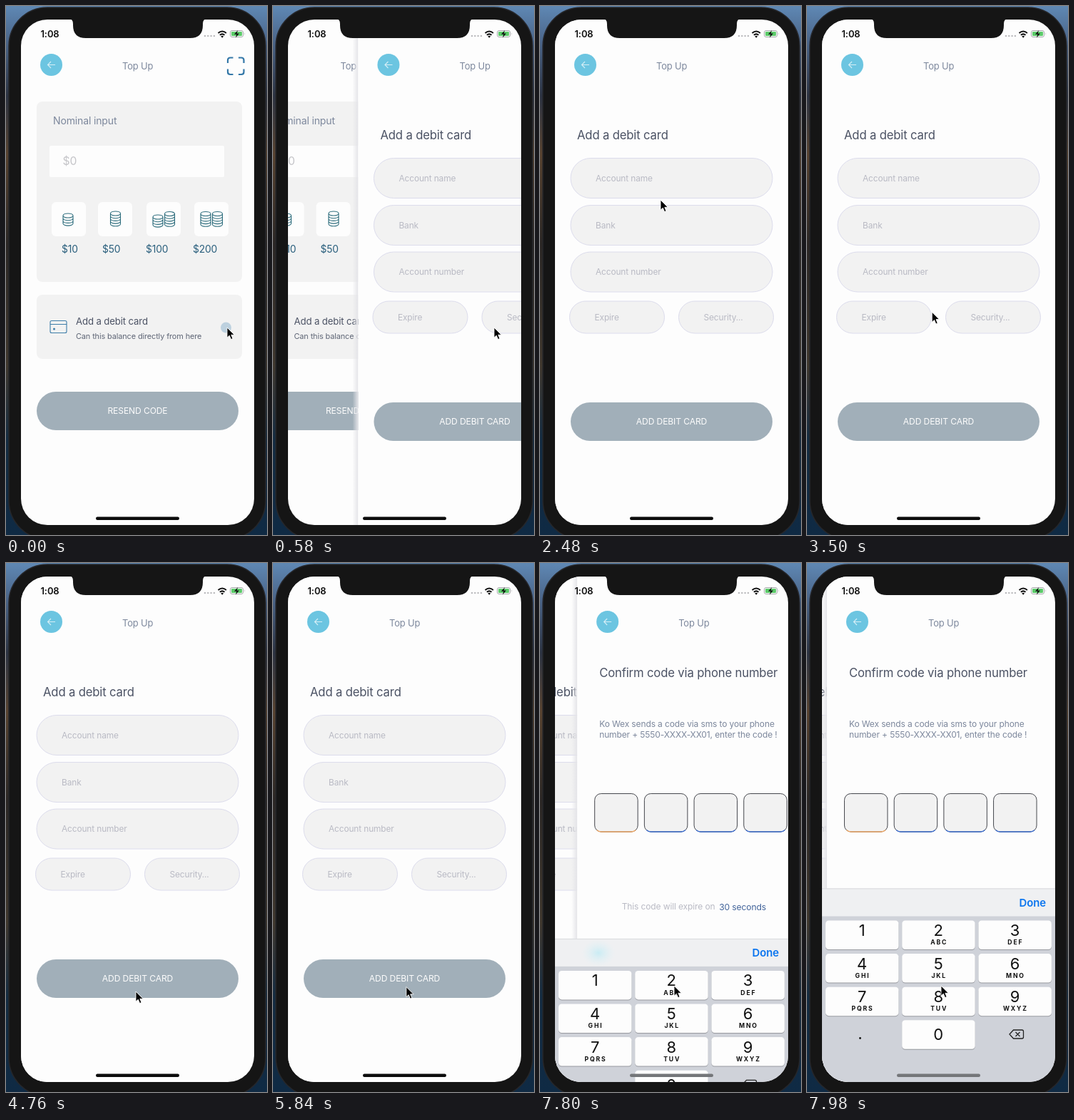
These frames come from a looping animation (366 px wide and 742 px high, 8 s). An HTML page:

```html
<!DOCTYPE html>
<html lang="en">
<head>
<meta charset="utf-8">
<title>Top Up</title>
<style>
  html, body { margin: 0; width: 100%; height: 100%; overflow: hidden; background: #151515; }
  svg { display: block; width: 366px; height: 742px; font-family: Inter, Roboto, sans-serif; }
  text { letter-spacing: -0.01em; white-space: pre; }
</style>
</head>
<body>
<svg id="stage" viewBox="0 0 366 742"></svg>
<script>
const LOOP = 8000, SCREEN_W = 327;
const PAPER = '#fdfdfd', PANEL = '#f2f2f2', BUTTON = '#a1afb9', BEZEL = '#151515';
const TEAL = '#2c6c7c', NAVY = '#2a5f7d', DARK = '#4b5264', SLATE = '#7c879c', MUTED = '#b9bac4';

const rect = (x, y, w, h, r, fill, extra = '') =>
  `<rect x="${x}" y="${y}" width="${w}" height="${h}" rx="${r}" fill="${fill}" ${extra}/>`;
const text = (x, y, size, fill, content, extra = '') =>
  `<text x="${x}" y="${y}" font-size="${size}" fill="${fill}" ${extra}>${content}</text>`;
const middle = 'text-anchor="middle"';

const header = () => `
  <circle cx="63.5" cy="82.5" r="15.5" fill="#6cc5e1"/>
  <path d="M69 82.5H58.5M63 78l-4.5 4.5 4.5 4.5" fill="none" stroke="#d5eef6" stroke-width="1.1"/>
  ${text(163, 88.5, 12.9, SLATE, 'Top Up')}`;

const page = (id, body) => `<g id="${id}">
  ${id === 'home' ? '' : rect(13, 0, 8, 742, 0, 'url(#edge)')}
  ${rect(21, 0, SCREEN_W, 742, 0, PAPER)}${header()}${body}</g>`;

const button = (y, label) =>
  rect(43, y, 283, 54, 27, BUTTON) + text(184.5, y + 31.2, 12.1, PAPER, label, middle);

const field = (x, y, w, h, label) =>
  rect(x, y, w, h, h / 2, PANEL, 'stroke="#dcdcec" stroke-width="1"') +
  text(x + 35, y + h / 2 + 4.3, 11.9, MUTED, label);

// A pile of coins: the top disc plus the visible rims beneath it.
function coins(cx, top, count) {
  let d = `M${cx - 7} ${top}a7 3 0 0 1 14 0a7 3 0 0 1-14 0`;
  for (let i = 1; i <= count; i++) {
    d += `M${cx - 7} ${top + i * 3.7 - 3.7}v3.7a7 3 0 0 0 14 0v-3.7`;
  }
  return `<path d="${d}" fill="none" stroke="${TEAL}" stroke-width="1.1"/>`;
}

const piles = [
  coins(87, 294, 3),
  coins(153.5, 291, 4),
  coins(213, 296, 3) + coins(229.5, 291.5, 4),
  coins(280, 291.5, 4) + coins(296.5, 291.5, 4)
];
const amounts = [[64, 78, '$10'], [129, 135, '$50'], [197, 196, '$100'], [264, 262, '$200']];

const home = page('home', `
  <path d="M311 80v-4q0-3.5 3.5-3.5h4M326 72.5h4q3.5 0 3.5 3.5v4M333.5 88.5v4q0 3.5-3.5 3.5h-4M318.5 96h-4q-3.5 0-3.5-3.5v-4"
    fill="none" stroke="#3478a8" stroke-width="2.2"/>
  ${rect(43, 134, 288, 253, 8, PANEL)}
  ${text(66, 165.8, 14, SLATE, 'Nominal input')}
  ${rect(61, 196, 245, 44, 2, PAPER)}
  ${text(79.5, 223, 15.7, '#c5c5c9', '$0')}
  ${amounts.map(([x, tx, label], i) =>
    rect(x, 275, 48, 48, 6, PAPER) + piles[i] + text(tx, 346, 13.8, NAVY, label)).join('')}
  ${rect(43, 405, 288, 90, 8, PANEL)}
  ${rect(62, 441.5, 23, 17, 2, 'none', 'stroke="#3d7da8" stroke-width="1.1"')}
  <path d="M62 446.5h23" stroke="#3d7da8"/><circle cx="67.5" cy="453" r="1.5" fill="#3d7da8"/>
  ${text(98, 447, 13.2, DARK, 'Add a debit card')}
  ${text(98, 467.3, 10.9, '#5f6676', 'Can this balance directly from here')}
  <circle cx="308.5" cy="451" r="7.5" fill="#bdd1df"/>
  ${button(541, 'RESEND CODE')}`);

const form = page('form', `
  ${text(52, 187, 16.7, DARK, 'Add a debit card')}
  ${field(43, 213.5, 283, 56, 'Account name')}
  ${field(43, 279.5, 283, 56, 'Bank')}
  ${field(43, 345, 283, 56, 'Account number')}
  ${field(41.5, 414, 133, 45, 'Expire')}
  ${field(194.5, 414, 133, 45, 'Security...')}
  <g id="submit">${button(556, 'ADD DEBIT CARD')}</g>`);

const codeBox = (_, i) => {
  const x = 45.5 + i * 69.7;
  return rect(x, 323.5, 60.5, 53.5, 9, PANEL, 'stroke="#45474d" stroke-width="1"') +
    `<path d="M${x + 3} 374.5q2.5 2.5 6 2.5h42.5q3.5 0 6-2.5" fill="none" stroke="${i ? '#3f6fd0' : '#eda766'}" stroke-width="1.3"/>`;
};

const confirmPage = page('confirm', `
  ${text(52, 160, 16.7, DARK, 'Confirm code via phone number')}
  ${text(52, 230.3, 12, SLATE, 'Ko Wex sends a code via sms to your phone')}
  ${text(52, 245.3, 12, SLATE, 'number + 5550-XXXX-XX01, enter the code !')}
  ${Array.from({ length: 4 }, codeBox).join('')}
  ${text(83.5, 486.3, 12, MUTED, 'This code will expire on')}
  ${text(220, 487.3, 12.1, '#41639a', '30 seconds')}`);

const letters = ['', 'ABC', 'DEF', 'GHI', 'JKL', 'MNO', 'PQRS', 'TUV', 'WXYZ'];

function key(col, row, digit, sub) {
  const x = 26 + col * 107.2, y = 45 + row * 46.6, cx = x + 51;
  return rect(x, y + 1, 102.5, 40.5, 4.5, '#97999f') + rect(x, y, 102.5, 40.5, 4.5, PAPER) +
    text(cx, y + (digit ? 21.5 : 28), 22, '#111', digit || '0', middle) +
    (sub ? text(cx + 1, y + 33.8, 8.7, '#111', sub, `${middle} font-weight="700" style="letter-spacing:1.8px"`) : '');
}

const keyboard = `<g id="keyboard">
  ${rect(21, 0, SCREEN_W, 300, 0, '#cfd2d9')}
  ${rect(21, 0, SCREEN_W, 39, 0, '#eff0f2')}
  <path d="M21 .5H348" stroke="#dbdcdf"/>
  <ellipse id="glow" cx="82" cy="20" rx="24" ry="19" fill="url(#blur)"/>
  ${text(297.5, 25.5, 15, '#0b75ef', 'Done', 'font-weight="600"')}
  ${letters.map((sub, i) => key(i % 3, Math.floor(i / 3), i + 1, sub)).join('')}
  ${key(1, 3, 0, '')}
  <circle cx="74.5" cy="210" r="1.4" fill="#111"/>
  <path d="M284 204.5l5.5-6h12q2 0 2 2v8q0 2-2 2h-12zM292.5 201.5l6 6m0-6l-6 6" fill="none" stroke="#222" stroke-width="1.3"/>
</g>`;

const statusBar = `
  ${text(48.5, 44, 13, '#111', '1:08', 'font-weight="600"')}
  ${[279, 283.3, 287.6, 291.9].map(x => `<circle cx="${x}" cy="42" r="1.3" fill="#bcbcbf"/>`).join('')}
  <path d="M297.5 38q5.7-5 11.4 0M299.9 40.8q3.3-2.9 6.6 0" fill="none" stroke="#111" stroke-width="2"/>
  <path d="M301.2 42.5q2-1.5 4 0l-2 2.3z" fill="#111"/>
  ${rect(314.5, 34.5, 18, 9, 2.5, 'none', 'stroke="#a6a8aa"')}
  ${rect(316, 36, 15, 6, 1.2, '#5ccb6a')}
  <path d="M334.5 37.5q1.5 1.5 0 3z" fill="#a6a8aa"/>
  <path d="M325 34l-5 5.8h3.3l-1.3 4.7 5-6h-3.3z" fill="#111"/>`;

const stops = [[0, '#5f88b4'], [.07, '#4a6488'], [.17, '#2c3342'], [.28, '#584330'],
  [.45, '#2b2725'], [.68, '#40382e'], [.82, '#142c42'], [1, '#0f2a44']];

document.getElementById('stage').innerHTML = `
  <defs>
    <linearGradient id="backdrop" x2="0" y2="1">
      ${stops.map(([o, c]) => `<stop offset="${o}" stop-color="${c}"/>`).join('')}
    </linearGradient>
    <linearGradient id="edge">
      <stop stop-color="#e4e4e8" stop-opacity="0"/><stop offset="1" stop-color="#e4e4e8"/>
    </linearGradient>
    <radialGradient id="blur">
      <stop stop-color="#c9ecf4"/><stop offset="1" stop-color="#e2f1f5" stop-opacity="0"/>
    </radialGradient>
    <clipPath id="glass">${rect(21, 19, SCREEN_W, 709, 37, '#fff')}</clipPath>
  </defs>
  ${rect(0, 0, 366, 742, 0, 'url(#backdrop)')}
  ${rect(4, 2, 360, 746, 54, BEZEL, 'stroke="#26272b" stroke-width="1.5"')}
  <g clip-path="url(#glass)">
    ${home}${form}${confirmPage}${keyboard}${statusBar}
    ${rect(126, 716.5, 117, 4.5, 2.2, '#0c0c0c', 'id="indicator"')}
  </g>
  <path d="M88 18q6 0 6 7v2q0 18 18 18H258q18 0 18-18v-2q0-7 6-7z" fill="${BEZEL}"/>
  <path id="cursor" d="M0 0V14.2L3.3 11.2 5.6 16.6 8 15.6 5.8 10.3H10.3Z" fill="#000" stroke="#fff" stroke-width=".9"/>`;

const el = id => document.getElementById(id);
const move = (id, x, y = 0) => el(id).setAttribute('transform', `translate(${x} ${y})`);
const ramp = (t, from, to) => Math.min(1, Math.max(0, (t - from) / (to - from)));
const smooth = u => u * u * (3 - 2 * u);

// Critically damped spring, from 0 to 1.
function spring(t, start, omega) {
  const a = Math.max(0, t - start) / 1000 * omega;
  return 1 - Math.exp(-a) * (1 + a);
}

// Waiting pages rest far enough right to hide their edge shadow.
const slideIn = progress => progress ? SCREEN_W * (1 - progress) : SCREEN_W + 20;

const cursorPath = [[0, 310, 451], [1450, 310, 451], [2400, 169, 272], [2700, 169, 272],
  [4350, 182, 601], [5300, 182, 601], [6050, 188, 593], [LOOP, 188, 593]];

function cursorAt(t) {
  const i = cursorPath.findIndex(([time]) => time > t);
  const [t0, x0, y0] = cursorPath[i - 1], [t1, x1, y1] = cursorPath[i];
  const u = smooth(ramp(t, t0, t1));
  return [x0 + (x1 - x0) * u, y0 + (y1 - y0) * u];
}

const [face, label] = el('submit').children;

function render(t) {
  const toForm = spring(t, 340, 10.1), toConfirm = spring(t, 7408, 10.05);
  const rise = spring(t, 7580, 10.8);
  move('home', -98 * toForm);
  move('form', slideIn(toForm) - 98 * toConfirm);
  move('confirm', slideIn(toConfirm));
  move('keyboard', 0, 728 - 292 * rise);
  el('glow').setAttribute('opacity', 1 - ramp(t, 7800, 7920));
  el('indicator').setAttribute('fill', rise > .05 ? '#747679' : '#0c0c0c');
  const pressed = smooth(ramp(t, 6600, 6760)) - smooth(ramp(t, 7000, 7250));
  face.style.fill = `color-mix(in srgb, #e9ebee ${pressed * 100}%, ${BUTTON})`;
  label.setAttribute('opacity', 1 - .2 * pressed);
  move('cursor', ...cursorAt(t));
}

function tick() {
  render(performance.now() % LOOP);
  requestAnimationFrame(tick);
}
tick();
</script>
</body>
</html>
```
